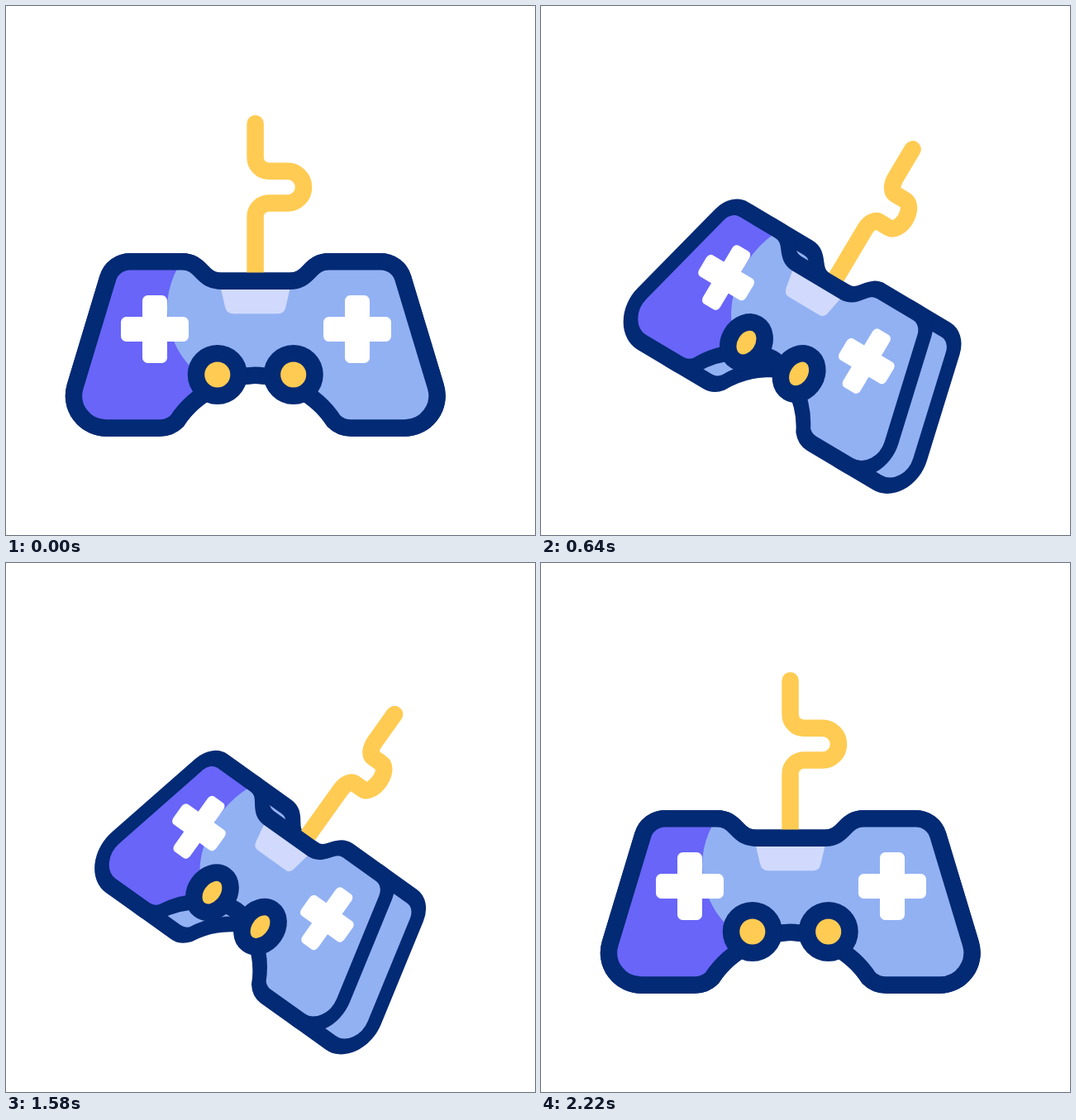
An HTML page that plays this animation: 640 by 640 pixels, repeating every 2400 ms.

```html
<!DOCTYPE html>
<html lang="en">
<head>
<meta charset="utf-8">
<title>Game controller</title>
<style>
  html, body { margin: 0; width: 100%; height: 100%; overflow: hidden; background: #fff; }
  svg { display: block; width: 100%; height: 100%; }
  .line { fill: none; stroke-width: 20.5; stroke-linejoin: round; vector-effect: non-scaling-stroke; }
  .navy { stroke: #032a74; }
  .gold { stroke: #ffcb52; }
  .round { stroke-linecap: round; }
  .light { fill: #92b1f3; }
</style>
</head>
<body>
<svg viewBox="0 0 640 640">
  <defs>
    <path id="body" d="M150 309.3 H213 C224 309.3 230 314 236.5 321 S249 332.7 260 332.7
      H343.5 C354.5 332.7 360.5 328 367 321 S379.5 309.3 390.5 309.3 H453.5
      A28 28 0 0 1 480.3 329.2 L519.8 460.2 A39 39 0 0 1 482.5 510.5
      H417.5 C407.5 510.5 401.5 507 396.5 502 C373.5 466 326.5 446.7 301.75 446.7
      C277 446.7 230 466 207 502 C202 507 196 510.5 186 510.5 H121
      A39 39 0 0 1 83.7 460.2 L123.2 329.2 A28 28 0 0 1 150 309.3 Z"/>
    <clipPath id="inside"><use href="#body"/></clipPath>
    <g id="cross" fill="#fff">
      <rect x="-41" y="-15" width="82" height="30" rx="6.5"/>
      <rect x="-15" y="-41" width="30" height="82" rx="6.5"/>
    </g>
  </defs>
  <g id="pad">
    <g id="back">
      <use href="#body" class="light"/>
      <use href="#body" class="line navy"/>
    </g>
    <g id="cable">
      <path class="line gold round" d="M301.6 142.3 V183.3 A16.5 16.5 0 0 0 318.1 199.8 H340.7
        A19.35 19.35 0 0 1 340.7 238.5 H318.1 A16.5 16.5 0 0 0 301.6 255 V326"/>
    </g>
    <g id="front">
      <use href="#body" class="light"/>
      <path clip-path="url(#inside)" fill="#6865f8" d="M60 290 V530 H297 V468 A102 102 0 0 1 297 264 V290 Z"/>
      <path fill="#d1dafd" d="M259 338 L265 364 Q267 372.3 275 372.3 H329 Q337 372.3 338.5 364 L344.5 338 Z"/>
      <use href="#body" class="line navy"/>
      <use href="#cross" x="180" y="391"/>
      <use href="#cross" x="425" y="391"/>
      <circle class="line navy" cx="255.8" cy="446" r="25.8" style="fill:#ffcb52"/>
      <circle class="line navy" cx="347.7" cy="446" r="25.8" style="fill:#ffcb52"/>
    </g>
  </g>
  <g id="rays">
    <path class="line gold round"/>
    <path class="line gold round"/>
    <path class="line gold round"/>
  </g>
</svg>
<script>
const LOOP = 2400, TURN = 1158, END = 2225;
const MID = 301.75, ANGLE = 43.7;
const $ = id => document.getElementById(id);
const clamp = v => Math.min(1, Math.max(0, v));
const smooth = (t, a, b) => { const x = clamp((t - a) / (b - a)); return x * x * (3 - 2 * x); };

// Each ray: inner x, y, then its reach outward.
const rays = [
  [177.8, 195.9, -68.7, -38.7],
  [208.9, 178.5, -21.1, -70.4],
  [241.7, 168.5, 29.9, -59.9]
];

// Symmetric cubic bezier (.78, 0, .22, 1), solved by bisection.
function ease(x) {
  let lo = 0, hi = 1;
  for (let i = 0; i < 30; i++) {
    const s = (lo + hi) / 2, r = 1 - s;
    if (2.34 * s * r * r + 0.66 * s * s * r + s * s * s < x) lo = s; else hi = s;
  }
  return lo * lo * (3 - 2 * lo);
}

function place(id, shift, scale) {
  $(id).setAttribute('transform',
    `translate(${MID + shift} 0) scale(${scale} 1) translate(${-MID} 0)`);
}

function draw(t) {
  const e = t >= END ? 0 : t < TURN ? ease(t / TURN) : ease((END - t) / (END - TURN));
  const bow = 10.5 * e * (1 - e);
  $('pad').setAttribute('transform', `rotate(${ANGLE * e} 302 489) translate(${bow} 0)`);
  place('back', -18 * e, 1 - 0.275 * e);
  place('cable', -52 * e, 1 - 0.55 * e);
  place('front', -75 * e, 1 - 0.275 * e);

  const head = smooth(t, 700, 980), tail = smooth(t, 840, 1080);
  $('rays').style.display = head > tail ? '' : 'none';
  rays.forEach(([x, y, dx, dy], i) => {
    $('rays').children[i].setAttribute('d',
      `M${x + dx * tail} ${y + dy * tail} L${x + dx * head} ${y + dy * head}`);
  });
}

function tick() {
  draw(performance.now() % LOOP);
  requestAnimationFrame(tick);
}
tick();
</script>
</body>
</html>
```
